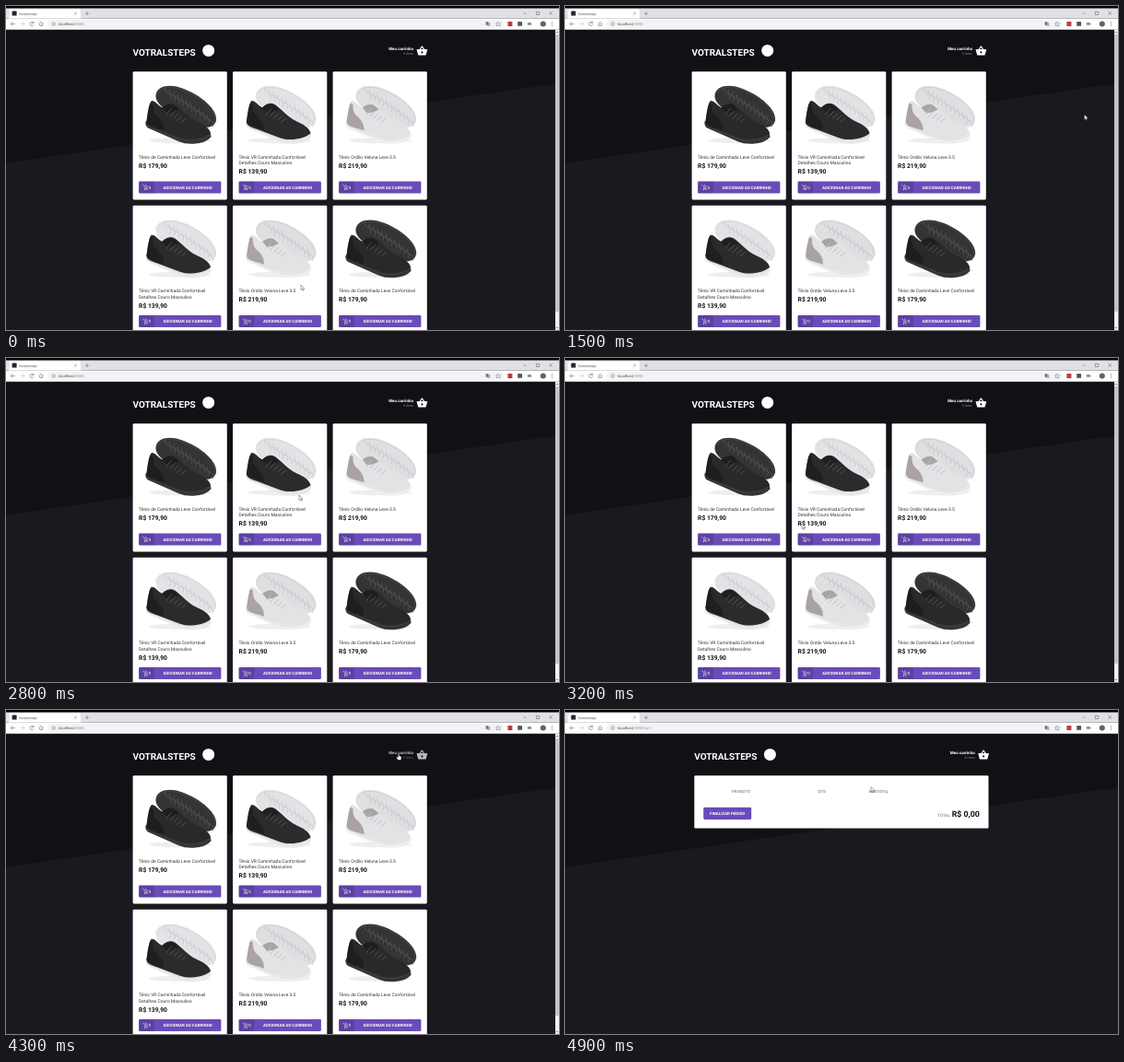
Write an HTML page that moves like this. It is 600 px wide and 352 px high and loops after 5 s.

```html
<!DOCTYPE html>
<html lang="pt-BR">
<head>
<meta charset="utf-8">
<title>Votralsteps</title>
<style>
html, body { margin: 0; width: 100%; height: 100%; overflow: hidden; background: #000; }
svg { display: block; width: 100%; height: 100%; text-rendering: geometricPrecision; }
text { font-family: Roboto, sans-serif; white-space: pre; }
.ui { font-family: "Open Sans", sans-serif; }
.b { font-weight: 700; }
</style>
</head>
<body>
<svg id="stage" viewBox="0 0 600 352"></svg>
<script>
const LOOP = 5000, STEP = 100;
const PURPLE = '#6a4bba';
const stage = document.getElementById('stage');

const rect = (x, y, w, h, fill, r = 0) =>
  `<rect x="${x}" y="${y}" width="${w}" height="${h}" rx="${r}" fill="${fill}"/>`;
const circle = (x, y, r, fill) => `<circle cx="${x}" cy="${y}" r="${r}" fill="${fill}"/>`;
const text = (x, y, size, fill, str, cls = '', anchor = 'start') =>
  `<text x="${x}" y="${y}" font-size="${size}" fill="${fill}" class="${cls}" text-anchor="${anchor}">${str}</text>`;
const fill = (d, color) => `<path d="${d}" fill="${color}"/>`;
const line = (d, color, w = 0.6, extra = '') =>
  `<path d="${d}" fill="none" stroke="${color}" stroke-width="${w}" ${extra}/>`;
const group = (x, y, body, attrs = '') => `<g transform="translate(${x} ${y})" ${attrs}>${body}</g>`;

function browser() {
  const ink = '#5f6368';
  return rect(0, 0, 600, 2.5, '#000') + rect(0, 2.5, 600, 11, '#dee1e6') +
    fill('M2 13.5Q3.5 13.5 3.5 11.5V5Q3.5 3.2 5.3 3.2H79Q80.8 3.2 80.8 5V11.5Q80.8 13.5 82.3 13.5Z', '#fff') +
    rect(6.6, 5.6, 5, 5, '#23262e', 0.6) +
    text(14, 9.7, 3.8, '#444', 'Votralsteps', 'ui') +
    line('M74.2 6.8l2.6 2.6m0-2.6l-2.6 2.6M86 8.2h4M88 6.2v4', ink, 0.5) +
    line('M561 8h3.6M589.4 6.2l3.4 3.4m0-3.4l-3.4 3.4M575.4 6.3h3.2v3.2h-3.2z', '#333', 0.4) +
    rect(0, 13.5, 600, 12.2, '#fff') + rect(45, 15, 495, 9.2, '#f1f3f4', 4.6) +
    line('M9.8 19.4H5.4m2-2l-2 2l2 2', ink) +
    line('M15.6 19.4H20m-2-2l2 2l-2 2', '#b8babd') +
    line('M29.7 18.3a2 2 0 1 0 .2 1.8M30 16.9v1.6h-1.6', ink) +
    line('M35.9 19.3l2.3-2.1l2.3 2.1M36.7 19v2.4h3V19', ink) +
    `<circle cx="51.8" cy="19.5" r="1.8" fill="none" stroke="${ink}" stroke-width=".45"/>` +
    line('M51.8 19.2v1.3M51.8 18.3v.4', ink, 0.45) +
    `<text x="57" y="21" font-size="4.1" class="ui" fill="#333">localhost<tspan fill="#888">:3000</tspan><tspan id="path" fill="#888">/cart</tspan></text>` +
    rect(520.7, 17.2, 2.8, 3.6, '#5f6368', 0.4) + rect(522.5, 18.2, 2.8, 3.6, '#a3a6aa', 0.4) +
    line('M534 17l.8 1.6l1.7.2l-1.2 1.2l.3 1.8l-1.6-.9l-1.6.9l.3-1.8l-1.2-1.2l1.7-.2z', ink, 0.45) +
    rect(544.4, 17, 5, 5, '#c6393d', 0.5) + rect(555.2, 17, 4.8, 4.8, '#53565b', 0.5) +
    rect(565.8, 18, 4.2, 2.8, '#8b8e92', 0.5) +
    circle(582.8, 19.5, 3, '#626363') +
    [17.6, 19.4, 21.2].map(y => circle(592.3, y, 0.5, ink)).join('');
}

function header(dx) {
  const basket = 'M.3 4.4H3.1L5.4.9Q5.8.4 6.2.9L8.5 4.4H11.3Q11.8 4.4 11.6 5L10.2 10.1Q9.9 11 9 11H2.6Q1.7 11 1.4 10.1L0 5Q-.1 4.4.3 4.4ZM4.4 4.4H7.2L5.8 2.3ZM5.8 6.6a1.1 1.1 0 1 0 .01 0Z';
  return group(dx, 0,
    text(137.5, 53.6, 10, '#fff', 'VOTRALSTEPS', 'b') +
    circle(219.7, 48.4, 6.5, '#fff') +
    `<g class="cart">` +
    text(442, 47.6, 4.5, '#fff', 'Meu carrinho', 'b', 'end') +
    text(442, 53.2, 3.75, '#85858a', '0 itens', '', 'end') +
    group(445.6, 42.6, `<path d="${basket}" fill="#fff" fill-rule="evenodd"/>`) + `</g>`);
}

const backdrop = () => rect(0, 25.7, 600, 327, '#1a1920') + fill('M0 25.7H600V84L0 170.5Z', '#111014');

const STYLES = {
  black: { back: '#343436', tread: '#58585b', upper: '#29292b', heel: '#1e1e20', sole: '#353537', lace: '#505054' },
  mixed: { back: '#e3e3e6', tread: '#c8c8cd', upper: '#2b2b2d', heel: '#1f1f21', sole: '#e9e9eb', lace: '#57575b' },
  white: { back: '#dfdfe2', tread: '#c5c5ca', upper: '#e3e3e6', heel: '#aaa2a5', sole: '#efeff1', lace: '#c0c0c5' }
};

// Pair of sneakers: a tilted sole behind, a side view in front.
function shoes(s) {
  let treads = '', laces = '';
  for (let i = 0; i < 11; i++) {
    const x = 35 + i * 4.6, y = 17 + i * 2.5 + i * i * 0.05;
    treads += `M${x} ${y}q-1 5 3.5 6.5t2 6.5`;
  }
  for (let i = 0; i < 5; i++) laces += `M${36 + i * 4} ${47 + i * 2.1}l6-${7 - i * 0.5}`;
  return `<ellipse cx="51" cy="75" rx="34" ry="3" fill="#eee"/>` +
    fill('M25 25C27 15 41 13 56 19C74 26 92 41 90.5 53C88 63 76 62 66 56C46 47 23 38 25 25Z', s.back) +
    line(treads, s.tread, 0.8) +
    line('M27 24C32 15 45 16 57 21C74 28 91 43 89 54', s.tread, 0.5) +
    fill('M14 54Q13 58 16 61L50 76Q57 79 66 78.5Q79 78 85 71L84 66L20 52Z', s.sole) +
    fill('M20 32C17 36 16 46 15 53C14 59 20 61 27 63L51 72C62 76 78 73 84.5 67C83 61 76 57 69 54C59 49 53 41 46 36C40 33 36 35 32 39C27 37 24 31 20 32Z', s.upper) +
    fill('M19 34C17 40 16 48 15 54Q15 58 21 60L34 64Q34 55 27 49Q21 45 22 36Z', s.heel) +
    fill('M32 39Q38 34 44 36L50 41Q44 45 37 45Z', s.heel) +
    line(laces, s.lace, 1) +
    line('M15 58L50 73Q66 78 84 69', s.tread, 0.35);
}

const CART = line('M0 .7h1l1.5 3h2.2l1-2.2M2.5 3.7l-.6 1h3.3M3.3 0v2.2m-.9-.9l.9.9l.9-.9', '#fff', 0.45) +
  circle(2, 5.7, 0.5, '#fff') + circle(4.5, 5.7, 0.5, '#fff');

const PRODUCTS = {
  black: { lines: ['Tênis de Caminhada Leve Confortável'], price: '179,90' },
  mixed: { lines: ['Tênis VR Caminhada Confortável', 'Detalhes Couro Masculino'], price: '139,90' },
  white: { lines: ['Tênis Ordilo Veluna Leve 3.5'], price: '219,90' }
};

function card(kind, i) {
  const { lines, price } = PRODUCTS[kind];
  const x = 137.6 + (i % 3) * 108.5, y = 71.2 + Math.floor(i / 3) * 145.6;
  return group(x, y,
    rect(0, 0, 102.2, 139.2, '#fff', 1.3) + shoes(STYLES[kind]) +
    lines.map((s, n) => text(6.5, 94.5 + n * 6.5, 4.95, '#333', s)).join('') +
    text(6.5, 98.2 + lines.length * 6.4, 6.75, '#111', 'R$ ' + price, 'b') +
    rect(6.5, 119.2, 89.3, 13.1, PURPLE, 1.3) +
    rect(6.5, 119.2, 16.8, 13.1, 'rgba(0,0,0,.13)', 1.3) +
    group(10.8, 122.7, CART) + text(17.2, 127.5, 4.4, '#fff', '0') +
    text(59.6, 127.4, 4.4, '#fff', 'ADICIONAR AO CARRINHO', 'b', 'middle'));
}

const shop = () => header(0) +
  ['black', 'mixed', 'white', 'mixed', 'white', 'black'].map(card).join('') +
  rect(596, 25.7, 4, 327, '#f1f1f1') + rect(596.3, 31, 3.4, 301, '#c1c1c1') +
  fill('M598 27.6l1.2 1.4h-2.4zM598 350.4l1.2-1.4h-2.4z', '#666');

const checkout = () => header(2.7) +
  rect(140.3, 71.2, 319.2, 57.4, '#fff', 1.3) +
  [[181, 'PRODUTO'], [274.6, 'QTD'], [329.4, 'SUBTOTAL']]
    .map(([x, s]) => text(x, 90.1, 4.4, '#999', s, 'b')).join('') +
  rect(150.2, 105.8, 52, 13.1, PURPLE, 1.3) +
  text(176.2, 114, 4.4, '#fff', 'FINALIZAR PEDIDO', 'b', 'middle') +
  text(418, 115.7, 4.5, '#999', 'TOTAL', 'b', 'end') +
  text(449.8, 115.7, 8.8, '#111', 'R$ 0,00', 'b', 'end');

const ARROW = '<path d="M0 0V5.6L1.3 4.4L2.2 6.3L3.1 5.9L2.3 4.1H4Z" fill="#fff" stroke="#222" stroke-width=".4"/>';
const HAND = '<path d="M-.6-2.6Q0-3.4.6-2.6V-.4L2.6.2Q3.2.5 3 1.5L2.5 4H-.7L-2.4 1.5Q-2.6.5-1.6.7L-.6 1.5Z" fill="#fff" stroke="#222" stroke-width=".35"/>';

stage.innerHTML = backdrop() + `<g id="shop">${shop()}</g><g id="checkout">${checkout()}</g>` +
  browser() + `<g id="pointer"><g id="arrow">${ARROW}</g><g id="hand">${HAND}</g></g>`;

const $ = id => document.getElementById(id);
const show = (id, on) => $(id).setAttribute('display', on ? 'inline' : 'none');
const carts = stage.querySelectorAll('.cart');

// Pointer stops: time, x, y
const ROUTE = [
  [0, 320, 303], [600, 450, 214], [1200, 563.5, 118], [1500, 563.5, 118], [1700, 521, 118.5],
  [1800, 521, 118.5], [2100, 492, 121], [2200, 492, 121], [2300, 488.5, 121],
  [2600, 312, 186], [2700, 301, 166], [2900, 335, 132], [3100, 286, 194],
  [3200, 257, 180], [3300, 254, 187], [3400, 259, 191],
  [3700, 345, 122], [4000, 419, 57], [4100, 425, 52], [4300, 426, 50.3],
  [4700, 426, 50.3], [4800, 380, 66], [4900, 332, 83.5]
];

function pointerAt(t) {
  const n = ROUTE.findIndex(p => p[0] > t);
  if (n < 0) return ROUTE[ROUTE.length - 1].slice(1);
  const [t0, x0, y0] = ROUTE[n - 1], [t1, x1, y1] = ROUTE[n];
  const k = (t - t0) / (t1 - t0);
  return [x0 + (x1 - x0) * k, y0 + (y1 - y0) * k];
}

function draw(ms) {
  const t = Math.floor((ms % LOOP) / STEP) * STEP;
  const hover = t >= 4100 && t < 4800, paid = t >= 4500;
  show('shop', !paid);
  show('checkout', paid);
  show('path', paid);
  show('arrow', !hover);
  show('hand', hover);
  carts.forEach(c => c.setAttribute('opacity', hover ? 0.7 : 1));
  $('pointer').setAttribute('transform', `translate(${pointerAt(t)})`);
}

let start;
function tick(now) {
  start ??= now;
  draw(now - start);
  requestAnimationFrame(tick);
}
draw(0);
requestAnimationFrame(tick);
</script>
</body>
</html>
```
